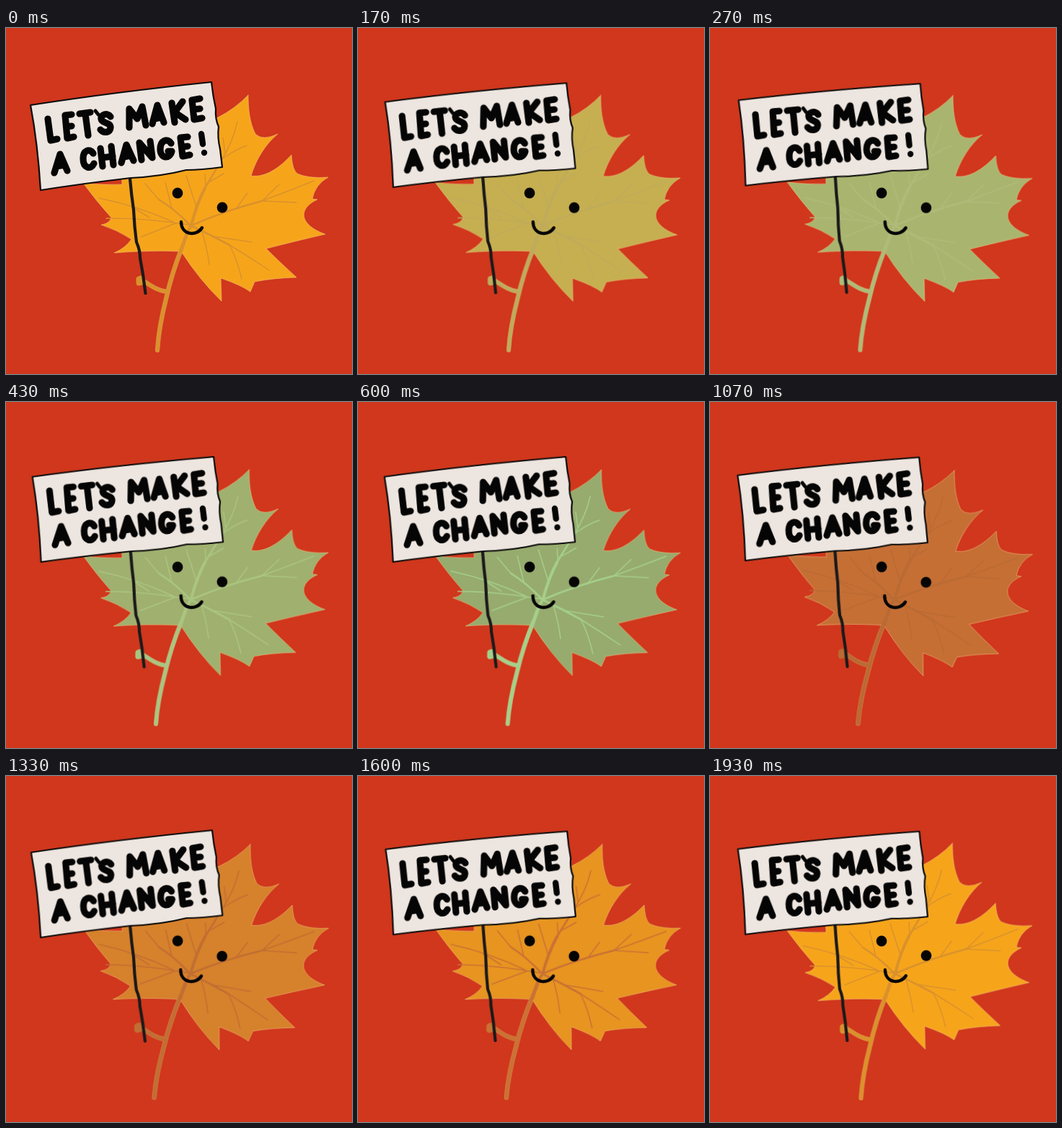
An HTML page for the animation above (1960 ms loop, 480 px wide and 480 px high).

```html
<!DOCTYPE html>
<html lang="en">
<head>
<meta charset="utf-8">
<title>Let's make a change!</title>
<style>
  html, body { margin: 0; width: 100%; height: 100%; overflow: hidden; background: #d0371c; }
  svg { display: block; width: 100vw; height: 100vh; }
  path { stroke-linecap: round; stroke-linejoin: round; }

  .leaf, .sign, .blade, .veins { animation: 1960ms linear infinite; }
  .leaf { transform-origin: 250px 235px; animation-name: sway; }
  .sign { transform-origin: 226px 260px; animation-name: wave; animation-timing-function: ease-in-out; }
  .blade { animation-name: blade; }
  .blade, .rim { stroke: rgba(245, 205, 135, .5); stroke-width: 1; }
  .rim { fill: none; stroke-width: 6.4; }
  .veins { animation-name: veins; fill: none; }
  .ink { fill: none; stroke: #050505; }

  @keyframes blade {
    0%, 98.5%, 100% { fill: #f6a51b; }
    13.9% { fill: #a9b56f; }
    30.6% { fill: #97ab6e; }
    40.8% { fill: #b8993d; }
    54.6% { fill: #c56f35; }
    81.6% { fill: #e79420; }
  }
  @keyframes veins {
    0%, 98.5%, 100% { stroke: #da912c; }
    13.9% { stroke: #afbb78; }
    30.6% { stroke: #a5cf8a; }
    40.8% { stroke: #c1a144; }
    54.6% { stroke: #ba6a33; }
    81.6% { stroke: #c97233; }
  }
  @keyframes sway {
    0% { transform: rotate(0deg); }
    13.9% { transform: rotate(.45deg); }
    30.6% { transform: rotate(.65deg); }
    40.8% { transform: rotate(.25deg); }
    54.6% { transform: rotate(1.25deg); }
    81.6% { transform: rotate(1.15deg); }
    98.5%, 100% { transform: rotate(.15deg); }
  }
  @keyframes wave {
    0%, 1.5% { transform: rotate(0deg); }
    13.9% { transform: rotate(2.07deg); }
    27.6% { transform: rotate(.4deg); }
    30.6% { transform: rotate(1deg); }
    40.8% { transform: rotate(1.8deg); }
    54.6% { transform: rotate(1.6deg); }
    68% { transform: rotate(.3deg); }
    81.6% { transform: rotate(1.6deg); }
    90% { transform: rotate(.6deg); }
    98.5%, 100% { transform: rotate(1.7deg); }
  }
</style>
</head>
<body>
<svg viewBox="0 0 480 480" role="img" aria-label="Let's make a change!">
  <defs>
    <path id="stem" d="M244 305 Q230 340 222 376 Q212 415 210 447 M223 366 C209 364 201 357 189 350"/>
  </defs>
  <rect width="480" height="480" fill="#d0371c"/>

  <g class="leaf">
    <use href="#stem" class="rim"/>
    <path class="blade" d="M336 93 C336 113 338 131 346 147 Q356 157 377 147
      C360 161 347 182 340 205 C362 208 382 191 396 176 Q397 196 404 202 Q419 209 447 207
      Q429 217 425 237 L432 238 C405 250 406 273 443 286
      Q400 296 361 306 Q380 325 403 346 Q370 347 345 352 L339 366
      Q327 357 298 347 L299 379 Q268 349 243 310
      Q200 308 150 312 Q166 305 174 293 Q154 280 132 273 Q144 271 146 263
      Q126 241 107 215 Q133 218 161 217 L160 200 L170 170 L250 140 L294 124 Q318 112 336 93 Z"/>
    <g class="veins">
      <use href="#stem" stroke-width="5.4"/>
      <path stroke-width="5" d="M251 285 L243 308"/>
      <path stroke-width="7" d="M184 348 L187 347 L188 353 L184 354 Z"/>
      <path stroke-width="4" d="M251 284 L257 274 Q264 245 276 222"/>
      <path stroke-width="2.6" d="M276 222 Q285 207 298 185 M257 274 Q305 253 355 240
        M256 274 Q284 287 310 301 M256 274 Q235 252 212 238"/>
      <path stroke-width="1.5" d="M298 185 Q315 158 321 130 M300 182 Q317 169 334 163
        M304 173 L301 152 M277 220 L276 203 M283 213 L302 202 M264 248 L250 205
        M355 240 Q395 225 427 212 M355 240 L379 217 M355 240 L403 242 M319 251 L335 229
        M310 301 Q338 318 365 336 M287 289 L341 297 M310 301 Q321 322 327 348
        M272 283 Q279 305 282 328 M212 238 L193 216 M230 250 L221 214
        M253 273 Q188 263 139 264 M232 269 Q180 246 129 236 M199 263 L173 247
        M235 271 L187 290"/>
    </g>
    <circle cx="238" cy="229" r="7.4" fill="#050505"/>
    <circle cx="300" cy="249" r="7.4" fill="#050505"/>
    <path class="ink" stroke-width="4.4" d="M243 269 C243 287 264 290 272 277"/>
  </g>

  <g class="sign">
    <path class="ink" stroke-width="4.2" style="stroke:#1b191a"
      d="M172 209 Q174 232 177 252 Q178 275 181 297 Q186 308 186 319 L190 342 L193.500 368"/>
    <path fill="#ede5df" stroke="#0b0b0b" stroke-width="2.2" d="M34 107 Q150 89 285 75
      Q287 94 291 112 Q290 126 295 137 Q293 151 297 168 L300 193
      Q270 197 250 197 Q215 206 173 208 Q105 216 48 225 Q44 160 34 107 Z"/>
    <g class="ink" stroke-width="9.2">
      <path d="M58 126 L62 156 L71 154"/>
      <path d="M91 120 L82 121 L85 153 L94 151 M84 137 L91 136"/>
      <path d="M102 119 L117 117 M110 119 L114 149"/>
      <path stroke-width="5" d="M124 115 L128 120"/>
      <path d="M145 123 C141 117 131 120 132 126 C133 133 145 130 145 138 C145 146 135 146 131 141"/>
      <path d="M171 138 L171 112 L182 126 L189 109 L194 135"/>
      <path d="M203 133 L210 107 L219 131 M206 126 L216 124"/>
      <path d="M230 104 L234 131 M245 102 L234 117 L249 127"/>
      <path d="M269 98 L258 100 L261 127 L272 125 M260 113 L269 112"/>

      <path d="M67 201 L75 175 L85 198 M70 192 L81 190"/>
      <path d="M121 174 C116 166 107 170 107 181 C107 195 118 197 122 188"/>
      <path d="M131 167 L134 192 M146 164 L149 190 M133 180 L148 178"/>
      <path d="M160 187 L167 162 L177 184 M163 179 L174 177"/>
      <path d="M188 183 L185 159 L203 180 L200 157"/>
      <path d="M229 160 C224 152 214 156 214 168 C214 181 227 183 230 171 L225 171"/>
      <path d="M252 151 L242 152 L245 178 L255 176 M244 165 L252 164"/>
      <path stroke-width="8.400" d="M271 147 L273 161 M275 173 L275 173.100"/>
    </g>
  </g>
</svg>
</body>
</html>
```
